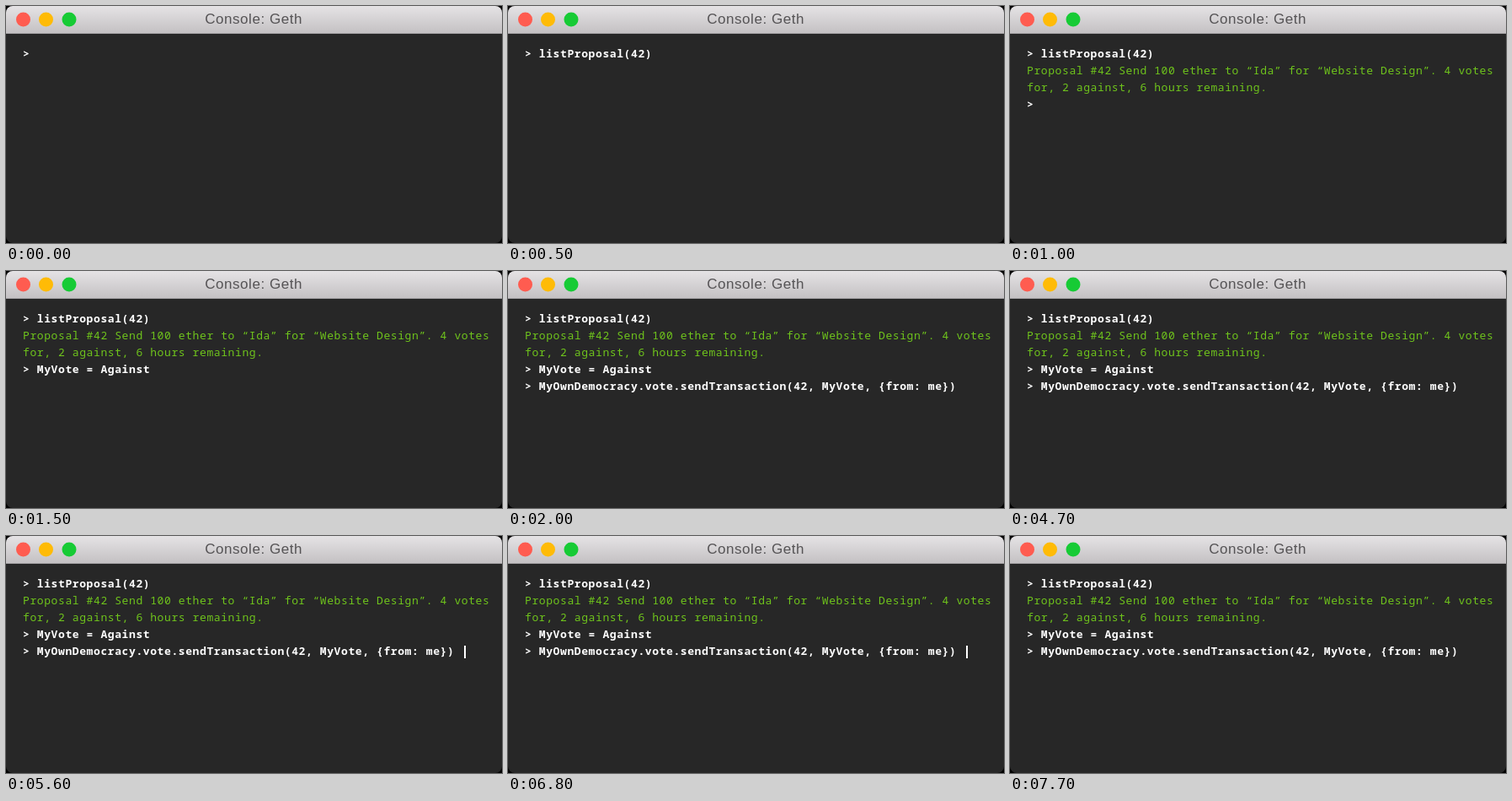
Write an HTML page that moves like this. It is 589 by 281 pixels and loops after 8000 ms.

```html
<!DOCTYPE html>
<html lang="en">
<head>
<meta charset="utf-8">
<title>Console</title>
<style>
  html, body { margin: 0; height: 100%; overflow: hidden; background: #000; }
  svg { display: block; width: 589px; height: 281px; }
  .title { font: 17px "Liberation Sans", Arial, sans-serif; letter-spacing: .55px; fill: #555355; }
  .line { font: 13px "Noto Sans Mono", monospace; letter-spacing: .6px; white-space: pre; }
  .input { font-weight: 600; fill: #fff; }
  .output { fill: #6fc41c; }
</style>
</head>
<body>
<svg viewBox="0 0 589 281">
  <defs>
    <linearGradient id="bar" x2="0" y2="1">
      <stop offset="0" stop-color="#e5e3e5"/>
      <stop offset="1" stop-color="#c4c1c3"/>
    </linearGradient>
    <clipPath id="window"><rect width="589" height="281" rx="8"/></clipPath>
  </defs>
  <g clip-path="url(#window)">
    <rect width="589" height="281" fill="#272727"/>
    <rect width="589" height="32" fill="url(#bar)"/>
    <rect y="32" width="589" height="1" fill="#a3a1a3"/>
    <circle cx="20.5" cy="16" r="8.5" fill="#ff5c50"/>
    <circle cx="47.5" cy="16" r="8.5" fill="#ffbb06"/>
    <circle cx="75" cy="16" r="8.5" fill="#17cb35"/>
    <text class="title" x="236.2" y="21">Console: Geth</text>
    <g id="console"></g>
    <rect id="cursor" x="544" y="130" width="2" height="15" fill="#fff"/>
  </g>
</svg>
<script>
  const LOOP = 8000, BLINK = 300;
  const consoleGroup = document.getElementById("console");
  const cursor = document.getElementById("cursor");

  // Each line: style, row, time it appears, text, column
  const lines = [
    ["input", 0, 0, ">", 0],
    ["input", 0, 500, "listProposal(42)", 2],
    ["output", 1, 1000, "Proposal #42 Send 100 ether to “Ida” for “Website Design”. 4 votes", 0],
    ["output", 2, 1000, "for, 2 against, 6 hours remaining.", 0],
    ["input", 3, 1000, ">", 0],
    ["input", 3, 1500, "MyVote = Against", 2],
    ["input", 4, 2000, "> MyOwnDemocracy.vote.sendTransaction(42, MyVote, {from: me})", 0],
  ].map(([style, row, start, content, column]) => {
    const node = document.createElementNS("http://www.w3.org/2000/svg", "text");
    node.setAttribute("class", "line " + style);
    node.setAttribute("x", 20 + column * 8.4);
    node.setAttribute("y", 61 + row * 20);
    node.textContent = content;
    consoleGroup.append(node);
    return { node, start };
  });

  const show = (node, visible) => node.setAttribute("visibility", visible ? "visible" : "hidden");

  // The first blink is held longer, then the cursor toggles steadily.
  function cursorVisible(t) {
    if (t < 2500) return false;
    return t < 2900 || Math.floor((t - 2900) / BLINK) % 2 === 1;
  }

  function draw(now) {
    const t = now % LOOP;
    for (const { node, start } of lines) show(node, t >= start);
    show(cursor, cursorVisible(t));
  }

  const began = performance.now();
  function tick() {
    draw(performance.now() - began);
    requestAnimationFrame(tick);
  }
  tick();
</script>
</body>
</html>
```
